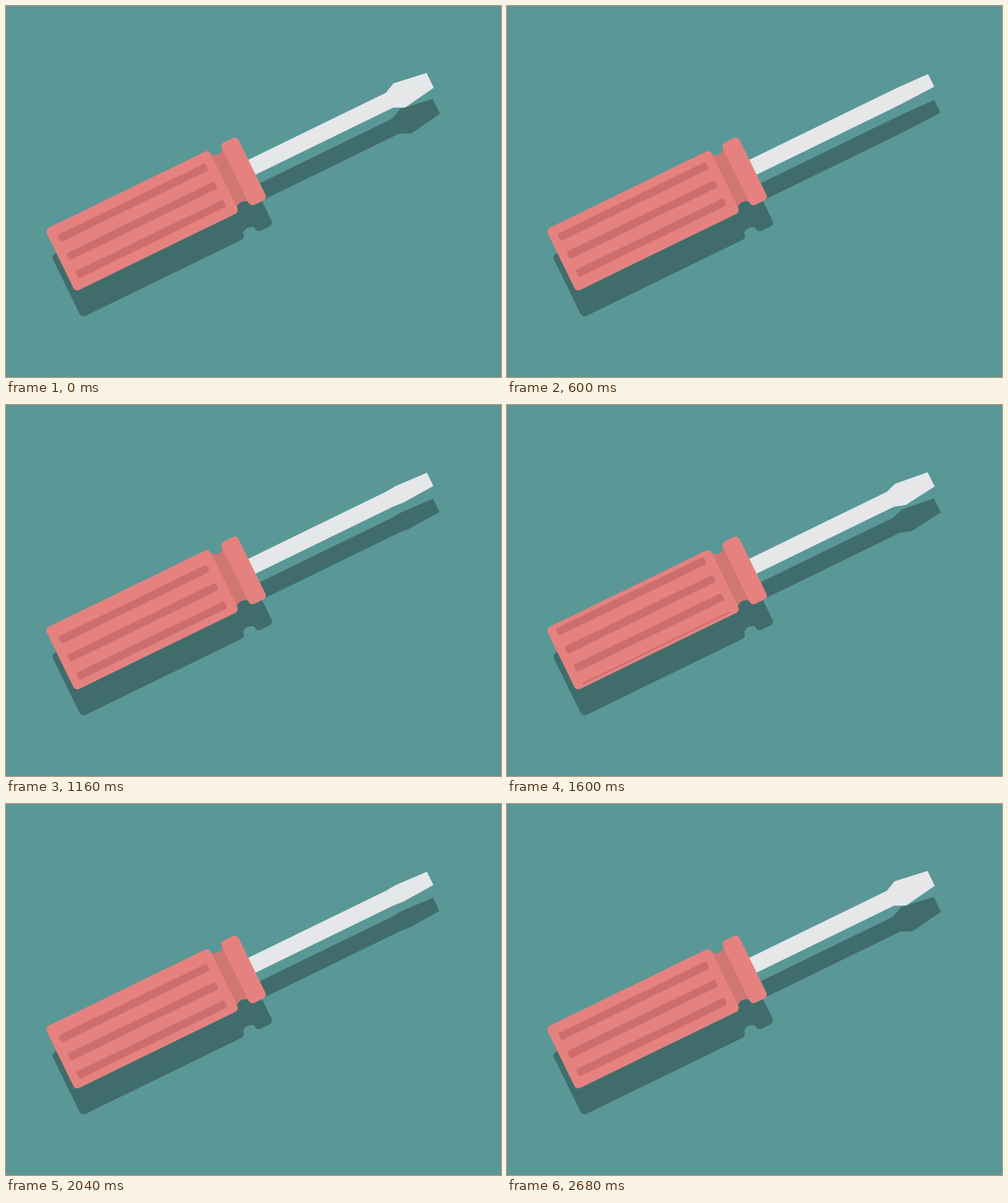
An HTML page for the animation above (3.24 s loop, 800 by 600 pixels).

```html
<!DOCTYPE html>
<html lang="en">
<head>
<meta charset="utf-8">
<title>Screwdriver</title>
<style>
  html, body { margin: 0; width: 100%; height: 100%; overflow: hidden; background: #599896; }
  svg { display: block; width: 800px; height: 600px; }
</style>
</head>
<body>
<svg viewBox="0 0 800 600">
  <defs>
    <path id="blade"/>
    <path id="neck" d="M188-46.5H193Q202-38.5 213-46.5H218V47H213Q202 39 193 47H188Z"/>
    <g id="grip">
      <rect x="-102" y="-56" width="294.7" height="112" rx="7"/>
      <rect x="212.8" y="-56" width="30.2" height="112.4" rx="7"/>
    </g>
    <clipPath id="face"><rect x="-102" y="-51.5" width="294.7" height="103"/></clipPath>
  </defs>
  <g transform="translate(10 42) rotate(-26) translate(0 408.6)" fill="#406d6c">
    <use href="#blade"/>
    <use href="#neck"/>
    <use href="#grip"/>
  </g>
  <g transform="rotate(-26) translate(0 408.6)">
    <use href="#blade" fill="#e5e7e9"/>
    <use href="#neck" fill="#d07774"/>
    <use href="#grip" fill="#e5827f"/>
    <g clip-path="url(#face)"><g id="grooves" fill="#cd6e6e"></g></g>
  </g>
</svg>
<script>
const LOOP = 3240, TICK = 40;
const START = 80, TURN = 440, TURNS = 6;
const PITCH = 32.7, TRAVEL = -38.5;

const blade = document.getElementById('blade');
const grooves = document.getElementById('grooves');

for (let i = 0; i < 5; i++) {
  const bar = document.createElementNS('http://www.w3.org/2000/svg', 'rect');
  const box = { x: -88.3, y: -39 + i * PITCH, width: 266.2, height: 12.8, rx: 3 };
  for (const key in box) bar.setAttribute(key, box[key]);
  grooves.append(bar);
}

const mix = (a, b, k) => a + (b - a) * k;

// Cubic bezier (.456, 0, .131, 1), solved by bisection
function ease(x) {
  let lo = 0, hi = 1;
  for (let i = 0; i < 24; i++) {
    const s = (lo + hi) / 2, r = 1 - s;
    if (3 * 0.456 * s * r * r + 3 * 0.131 * s * s * r + s * s * s < x) lo = s;
    else hi = s;
  }
  return lo * lo * (3 - 2 * lo);
}

// 0 = blade facing the viewer, 1 = blade edge-on
function turnAt(t) {
  const n = (t - START) / TURN;
  if (n <= 0 || n >= TURNS) return 0;
  const k = ease(n % 1);
  return Math.floor(n) % 2 ? 1 - k : k;
}

function draw(t) {
  const k = turnAt(t);
  const flare = mix(21.7, 12.4, k), tip = mix(13.4, 11.3, k);
  const edge = [[235, 13.4], [490, 13.4], [508.2, flare], [563.4, tip]];
  const outline = [...edge.map(([x, y]) => [x, -y]), ...edge.reverse()];
  blade.setAttribute('d', 'M' + outline.map(p => p.join(' ')).join('L') + 'Z');
  grooves.setAttribute('transform', `translate(0 ${TRAVEL * k})`);
}

const begin = performance.now();
function frame() {
  const t = (performance.now() - begin) % LOOP;
  draw(Math.floor(t / TICK) * TICK);
  requestAnimationFrame(frame);
}
frame();
</script>
</body>
</html>
```
